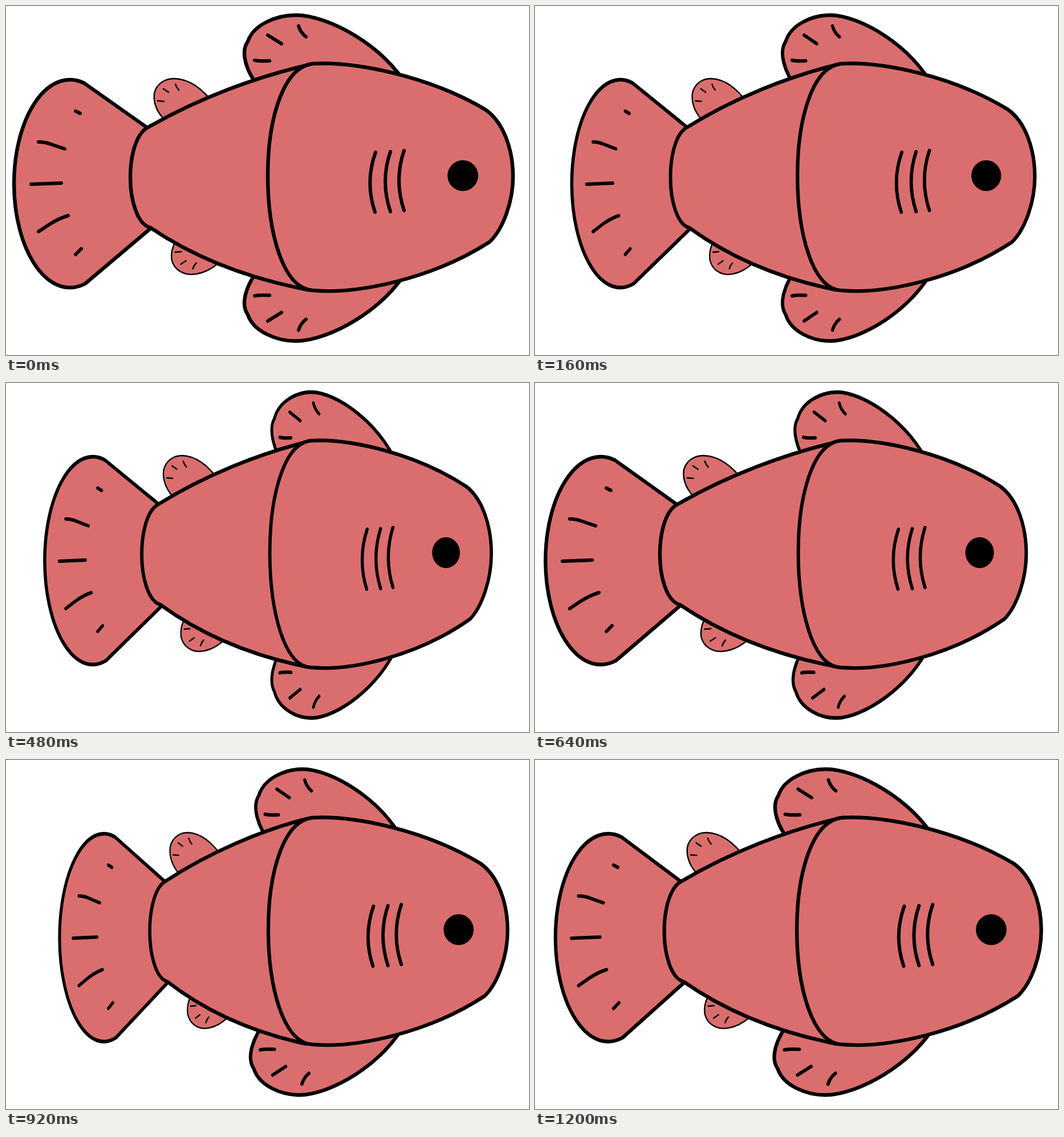
Recreate the animation shown at these times as an HTML page. Size 917 by 611 pixels, loop 1240 ms.

```html
<!DOCTYPE html>
<html>
<head>
<meta charset="utf-8">
<style>
  html, body { margin: 0; height: 100%; overflow: hidden; background: #fff; }
  svg { display: block; width: 917px; height: 611px; }
  path { fill: none; stroke: #000; stroke-width: 6; stroke-linecap: round; stroke-linejoin: round; }
  .skin { fill: #da6e6e; stroke-width: 6.4; }
  .small path { stroke-width: 2.5; }
</style>
</head>
<body>
<svg viewBox="0 0 917 611">
  <defs>
    <g id="bigFin">
      <path class="skin" d="M450 150C419 115 411 80 424 62C434 32 475 16 508 16C565 16 664 70 704 142"/>
      <path d="M436 95Q444 97 462 96M459 51L483 66M513 35Q516 46 526 54"/>
    </g>
    <g id="smallFin" class="small">
      <path class="skin" d="M285 205C265 190 258 170 260 153C264 135 280 127 295 127C322 128 345 145 365 172"/>
      <path d="M266 166L277 167M276 145L285 151M297 137Q299 143 303 147"/>
    </g>
  </defs>
  <g id="tail">
    <path class="skin" d="M249 214L137 135A98 182 0 1 0 139 486L254 389"/>
    <path d="M122 184L130 188M57 238Q68 238 79 242T103 250M44 312L97 310M57 395L75 383Q92 372 109 367M122 435L132 425"/>
  </g>
  <g id="smallTop"><use href="#smallFin"/></g>
  <g id="smallBottom"><use href="#smallFin" transform="translate(30.5 597) scale(1 -1)"/></g>
  <g id="bigTop"><use href="#bigFin"/></g>
  <g id="bigBottom"><use href="#bigFin" transform="translate(0 602.5) scale(1 -1)"/></g>
  <g id="body">
    <path class="skin" d="M530 103C440 124 340 160 248 213C228 224 218 262 218 300C218 340 230 382 253 388C340 447 440 480 530 497"/>
  </g>
  <g id="head">
    <path class="skin" d="M538 101C612 97 740 122 840 181C872 203 889 250 889 299C889 342 872 390 848 413C750 476 620 505 538 498C485 495 459 395 459 297C459 200 485 107 538 101Z"/>
    <path d="M648 256Q629 308 647 361M674 255Q656 307 674 360M698 253Q680 305 698 358"/>
    <circle cx="801" cy="297" r="27"/>
  </g>
</svg>
<script>
  const STEP = 40, STEPS = 31;
  const flap = [[0, 0], [8, 1], [16.2, 0], [24, 1], [31.7, 0]];
  const glide = mid => [[0, 0], [12, 1], [23, mid], [31.2, 0]];

  // Each part squeezes horizontally about its pivot; keys are [step, amount].
  const parts = [
    { id: 'tail', pivot: 399, squeeze: .265, keys: [[0, 0], [8.1, 1], [16.35, 0], [24.85, 1], [31.4, 0]] },
    { id: 'smallTop', pivot: 497, squeeze: .134, keys: flap },
    { id: 'smallBottom', pivot: 497, squeeze: .155, keys: flap },
    { id: 'body', pivot: 497, squeeze: .14, keys: flap },
    { id: 'bigTop', pivot: 625, squeeze: .232, keys: glide(.415) },
    { id: 'bigBottom', pivot: 625, squeeze: .232, keys: glide(.225) },
    { id: 'head', pivot: 496, squeeze: .0967, keys: glide(.25) }
  ];

  function valueAt(keys, step) {
    const i = keys.findIndex(key => key[0] > step);
    const [t0, v0] = keys[i - 1], [t1, v1] = keys[i];
    return v0 + (v1 - v0) * (step - t0) / (t1 - t0);
  }

  function draw() {
    const step = Math.floor(performance.now() / STEP) % STEPS;
    for (const { id, pivot, squeeze, keys } of parts) {
      const scale = 1 - squeeze * valueAt(keys, step);
      document.getElementById(id).setAttribute('transform',
        `translate(${pivot * (1 - scale)} 0) scale(${scale} 1)`);
    }
    requestAnimationFrame(draw);
  }
  draw();
</script>
</body>
</html>
```
